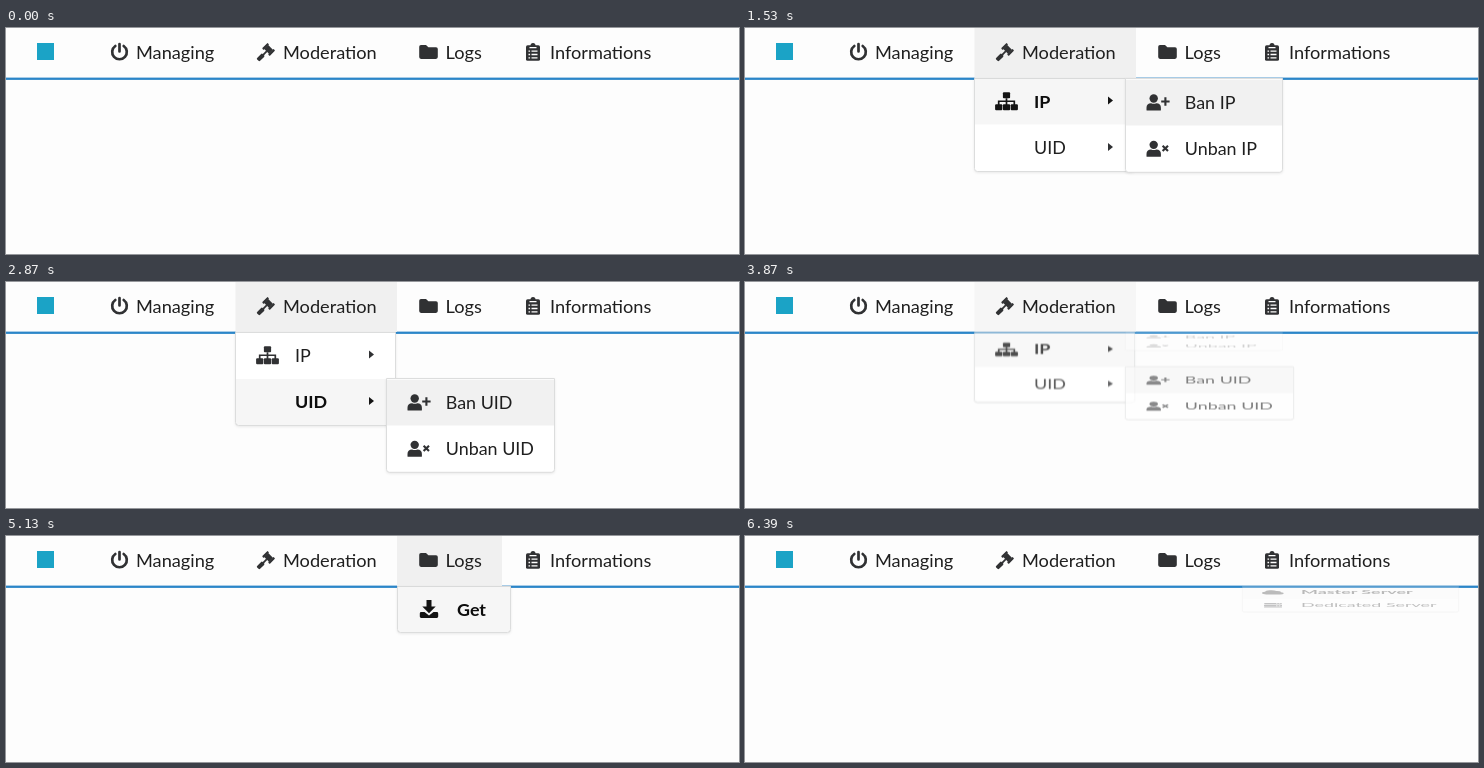
An HTML page for the animation above (6430 ms loop, 733 by 226 pixels).

```html
<!DOCTYPE html>
<html lang="en">
<head>
<meta charset="utf-8">
<title>Navigation menu</title>
<style>
  html, body { margin: 0; width: 100%; height: 100%; overflow: hidden; background: #fdfdfd; }
  svg { display: block; width: 100vw; height: 100vh; }
  text { font: 17.9px Lato, "Open Sans", sans-serif; fill: #1f1f1f; }
  .nav { font-size: 18.2px; }
  .bold text { font-weight: 700; fill: #0d0d0d; }
  .icon { fill: #303133; stroke: none; }
  .bold .icon { fill: #141414; }
  .line { fill: none; stroke: #303133; }
  .bold .line { stroke: #141414; }
  .cut { fill: none; stroke: #fff; }
  .panel { fill: #fff; stroke: #dcdddd; filter: drop-shadow(0 1px 1px rgba(34, 36, 38, .09)); }
</style>
</head>
<body>
<svg id="stage" viewBox="0 0 733 226" preserveAspectRatio="none"></svg>
<script>
const LOOP = 6430;

// Icons are drawn around their own centre.
const person = '<circle cx="-4.3" cy="-3.8" r="4.2"/><path d="M-11.5 7.6V5.4q0-4.6 4.6-4.6q2.6 1.2 5.2 0q4.6 0 4.6 4.6v2.2q0 .6-.6.6h-13.2q-.6 0-.6-.6z"/>';
const icons = {
  power: '<path class="line" stroke-width="2.7" stroke-linecap="round" d="M-4.2-6A7.3 7.3 0 1 0 4.2-6M0-8V-.5"/>',
  gavel: '<g transform="translate(2.6 -2.6) rotate(45)"><rect x="-3.3" y="-2.8" width="6.6" height="5.6"/><rect x="-5.4" y="-3.9" width="2.3" height="7.8" rx=".8"/><rect x="3.1" y="-3.9" width="2.3" height="7.8" rx=".8"/><rect x="-.9" y="2.5" width="1.8" height="5.5"/><rect x="-2.1" y="7.4" width="4.2" height="7.8" rx="1.1"/></g>',
  folder: '<path d="M-9.3-5.2q0-1.8 1.8-1.8h5l2.4 2.3h7.6q1.8 0 1.8 1.8v8q0 1.8-1.8 1.8h-15q-1.8 0-1.8-1.8z"/>',
  list: '<rect x="-7" y="-6.7" width="14" height="15.5" rx="1.6"/><circle cy="-6.5" r="2.5"/><path class="cut" stroke-width="1.3" d="M-3.5-4.4h7M-4.5-.8h1.6M-1.5-.8h6M-4.5 2.5h1.6M-1.5 2.5h6M-4.5 5.8h1.6M-1.5 5.8h6"/>',
  play: '<path d="M-8-7.2q0-2 1.9-1.1l13.2 7.2q1.8 1.1 0 2.2l-13.2 7.2q-1.9.9-1.9-1.1z"/>',
  stop: '<rect x="-8" y="-7.7" width="16" height="15.4" rx="1.5"/>',
  cross: '<path class="line" stroke-width="4.4" d="M-5-5L5 5M5-5L-5 5"/>',
  sitemap: '<rect x="-3.6" y="-9" width="7.2" height="6" rx="1"/><rect x="-11.4" y="3" width="7.2" height="6" rx="1"/><rect x="-3.6" y="3" width="7.2" height="6" rx="1"/><rect x="4.2" y="3" width="7.2" height="6" rx="1"/><path class="line" stroke-width="1.7" d="M0-3V4M-7.8 4V0H7.8V4"/>',
  plus: person + '<path class="line" stroke-width="2.1" d="M3.2-.8h8.4M7.4-5v8.4"/>',
  minus: person + '<path class="line" stroke-width="2.1" d="M4.6-3l5.4 5.4M10-3L4.6 2.4"/>',
  download: '<path d="M-2.5-9h5v6.5h4.2L0 4.2L-6.7-2.5h4.2z"/><path d="M-9.2 4.4q0-1.4 1.4-1.4h3.3L0 6.6L4.5 3h3.3q1.4 0 1.4 1.4v3.2q0 1.4-1.4 1.4h-15.6q-1.4 0-1.4-1.4z"/>',
  cloud: '<path d="M-6.5 7.5a5 5 0 0 1-1.4-9.6A6.2 6.2 0 0 1 3.4-5A4 4 0 0 1 8-.6A4.2 4.2 0 0 1 7 7.5z"/>',
  server: '<rect x="-9" y="-8" width="18" height="4.6" rx="1.2"/><rect x="-9" y="-2.3" width="18" height="4.6" rx="1.2"/><rect x="-9" y="3.4" width="18" height="4.6" rx="1.2"/><path class="cut" stroke-width="1.4" d="M3-5.7h1.5M5.8-5.7h1.5M3 0h1.5M5.8 0h1.5M3 5.7h1.5M5.8 5.7h1.5"/>'
};

const icon = (name, x, y) => name ? `<g class="icon" transform="translate(${x} ${y})">${icons[name]}</g>` : '';
const label = (s, x, y, cls = 'item') => `<text class="${cls}" x="${x}" y="${y}">${s}</text>`;
const caret = y => `<path class="icon" d="M363 ${y - 4}L368 ${y}L363 ${y + 4}z"/>`;

const head = (id, x, w, name, ix, s, tx) =>
  `<rect id="${id}" x="${x}" y="0" width="${w}" height="50" fill="#f0f0f0"/>` +
  icon(name, ix, 24) + label(s, tx, 31, 'nav');

// rows: [id, icon, text, has submenu]
function menu(id, x, y, w, rowH, iconX, textX, rows, pad = 0, inner = '') {
  const body = rows.map(([rid, name, s, more], i) => {
    const top = y + pad + i * rowH, mid = top + rowH / 2;
    return `<g id="${rid}"><rect x="${x + 1}" y="${top + .5}" width="${w - 2}" height="${rowH - .5}"/>` +
      icon(name, iconX, mid) + label(s, textX, mid + 6.5) + (more ? caret(mid - .7) : '') + '</g>';
  }).join('');
  const side = pad + rows.length * rowH - 3;
  return `<g id="${id}" data-y="${y}"><path class="panel" d="M${x + .5} ${y + .5}h${w - 1}v${side}q0 3-3 3h${7 - w}q-3 0-3-3z"/>${body}${inner}</g>`;
}

const sub = (id, y, w, key, what) => menu(id, 380, y, w, 46.3, 413, 439.8,
  [['ban' + key, 'plus', 'Ban ' + what], ['free' + key, 'minus', 'Unban ' + what]], 1.2);

const stage = document.getElementById('stage');
stage.innerHTML =
  '<rect width="733" height="226" fill="#fdfdfd"/>' +
  '<rect y="49.6" width="733" height="2.3" fill="#2b85c8"/>' +
  '<rect x="31" y="15" width="17" height="17" fill="#1ba3c6"/>' +
  head('hMng', 82, 146, 'power', 113.5, 'Managing', 130) +
  head('hMod', 229.5, 161.5, 'gavel', 260, 'Moderation', 277) +
  head('hLogs', 391, 105, 'folder', 422.5, 'Logs', 439.5) +
  head('hInfo', 497, 171, 'list', 527, 'Informations', 544) +
  menu('mng', 82, 50, 146, 43.8, 114, 142,
    [['rStart', 'play', 'Start'], ['rStop', 'stop', 'Stop'], ['rKill', 'cross', 'Kill']]) +
  menu('mod', 229, 50, 161, 46.5, 261.5, 289,
    [['rIp', 'sitemap', 'IP', 1], ['rUid', '', 'UID', 1]], 0,
    sub('ip', 50, 158, 'Ip', 'IP') + sub('uid', 96, 169, 'Uid', 'UID')) +
  menu('logs', 391, 50, 114, 46, 423, 451, [['rGet', 'download', 'Get']]) +
  menu('info', 497, 50, 217, 46, 528, 556,
    [['rMaster', 'cloud', 'Master Server'], ['rDed', 'server', 'Dedicated Server']]);

// Each burst: first change, last change, number of changes.
const bursts = [[50, 180, 4], [1180, 1530, 9], [2530, 2870, 9], [3870, 4130, 7], [5130, 5340, 6], [6340, 6390, 2]];
const IN = [.3, .6, .86, 1], OUT = [.75, .5, .24, 0], ON = [.5, 1], OFF = [.5, 0];

// Moves: burst, first step, part, value at each following step.
const moves = [
  [0, 0, 'hMng', ON], [0, 0, 'mng', IN], [0, 2, 'rStart', ON],
  [1, 0, 'hMng', [.85, .4, 0]], [1, 1, 'mng', OUT], [1, 5, 'rStart', [0]],
  [1, 1, 'hMod', ON], [1, 1, 'mod', IN], [1, 3, 'rIp', ON], [1, 5, 'ip', IN], [1, 6, 'banIp', ON],
  [2, 0, 'banIp', OFF], [2, 0, 'rIp', OFF], [2, 1, 'rUid', ON], [2, 1, 'ip', OUT],
  [2, 5, 'uid', IN], [2, 7, 'banUid', ON],
  [3, 0, 'hMod', OFF], [3, 0, 'mod', OUT], [3, 0, 'uid', OUT], [3, 0, 'ip', [.26, 0]],
  [3, 0, 'rIp', [1]], [3, 0, 'rUid', [0]], [3, 0, 'banUid', [.7, .3, 0]],
  [3, 1, 'hLogs', ON], [3, 3, 'logs', IN], [3, 5, 'rGet', ON],
  [4, 1, 'hLogs', OFF], [4, 1, 'logs', OUT], [4, 5, 'rGet', [0]],
  [4, 1, 'hInfo', ON], [4, 2, 'info', IN], [4, 4, 'rMaster', ON],
  [5, 0, 'hInfo', [.4, 0]], [5, 0, 'info', [.65, .28]]
];

function stepOf([from, to, n], t) {
  if (t < from) return -1;
  return t >= to ? n - 1 : Math.floor((t - from) / (to - from) * (n - 1));
}

function valuesAt(t) {
  const v = {};
  for (const [b, first, id, seq] of moves) {
    const k = stepOf(bursts[b], t) - first;
    v[id] = k >= 0 ? seq[Math.min(k, seq.length - 1)] : v[id] || 0;
  }
  return v;
}

const parts = Object.fromEntries([...stage.querySelectorAll('[id]')].map(el => [el.id, el]));
const strongRows = ['rStart', 'rIp', 'rUid', 'rGet', 'rMaster'];

function draw(t) {
  const v = valuesAt(t);
  for (const id in parts) {
    const el = parts[id], k = v[id] || 0;
    if (el.dataset.y) {
      const y = +el.dataset.y;
      el.setAttribute('display', k ? 'inline' : 'none');
      el.setAttribute('transform', `translate(0 ${y * (1 - k)}) scale(1 ${k || 1})`);
      el.setAttribute('opacity', k);
    } else if (el.tagName === 'rect') {
      el.setAttribute('opacity', k);
    } else {
      const strong = strongRows.includes(id);
      el.firstChild.setAttribute('opacity', k * (strong ? .035 : .055));
      el.classList.toggle('bold', strong && k >= .5);
    }
  }
}

const start = performance.now();
function tick() {
  draw((performance.now() - start) % LOOP);
  requestAnimationFrame(tick);
}
tick();
</script>
</body>
</html>
```
